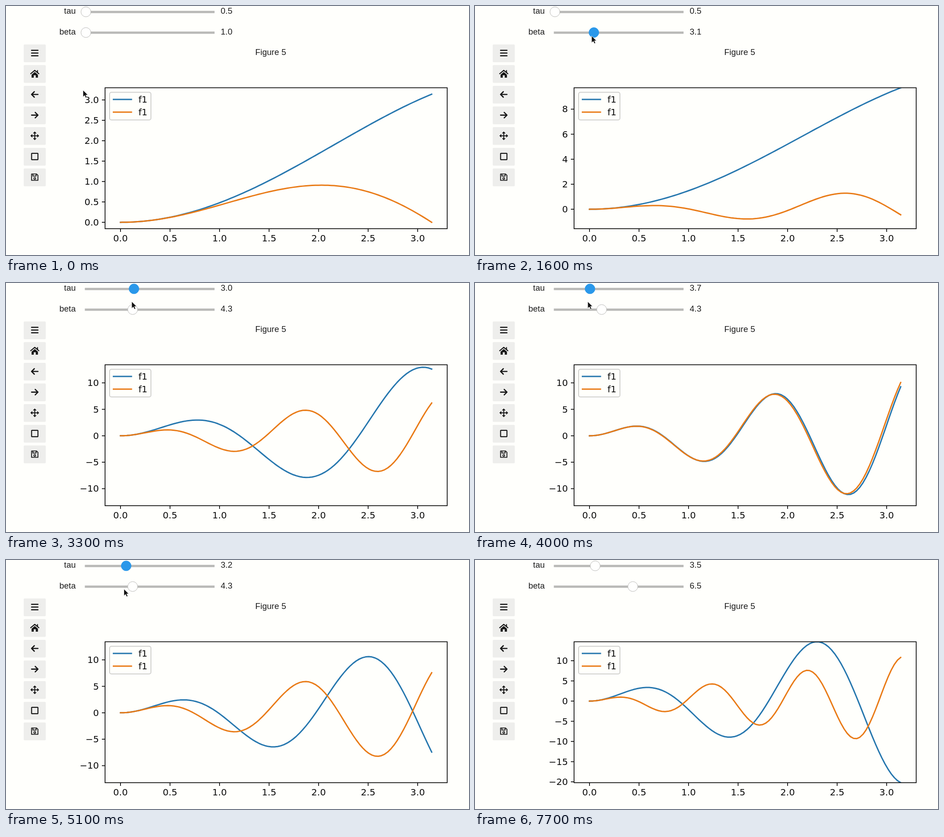
Recreate the animation shown at these times as an HTML page. Size 1019 by 549 pixels, loop 7900 ms.

```html
<!DOCTYPE html>
<html lang="en">
<head>
<meta charset="utf-8">
<title>Interactive plot</title>
<style>
  html, body { margin: 0; width: 100%; height: 100%; overflow: hidden; background: #fffffc; }
  svg { display: block; width: 1019px; height: 549px; }
  .ui { font: 18.5px "Liberation Sans", Arial, sans-serif; fill: #1c1c1c; }
  .plot { font: 20px "DejaVu Sans", sans-serif; fill: #0a0a0a; }
  .end { text-anchor: end; }
  .mid { text-anchor: middle; }
  .axis { fill: none; stroke: #0a0a0a; stroke-width: 1.7; }
  .curve { fill: none; stroke-width: 3; stroke-linecap: square; stroke-linejoin: round; }
  .blue { stroke: #2677ae; }
  .orange { stroke: #e97b17; }
  .icon { fill: none; stroke: #171717; stroke-width: 2.2; stroke-linecap: round; stroke-linejoin: round; }
  .solid { fill: #171717; }
</style>
</head>
<body>
<svg id="stage" viewBox="0 0 1019 549">
  <defs><clipPath id="clip"><rect x="218" y="180.3" width="753" height="310.7"/></clipPath></defs>
  <rect width="1019" height="549" fill="#fffffc"/>
  <g id="tools"></g>
  <g id="sliders"></g>
  <text class="ui mid" x="582.5" y="107.7">Figure 5</text>
  <g id="xTicks" class="plot"></g>
  <g id="yTicks" class="plot"></g>
  <g clip-path="url(#clip)">
    <polyline id="blue" class="curve blue"/>
    <polyline id="orange" class="curve orange"/>
  </g>
  <rect class="axis" x="218" y="180.3" width="753" height="310.7"/>
  <g class="plot">
    <rect x="228" y="190.3" width="91" height="61" rx="4" fill="#fffffc" fill-opacity=".8" stroke="#d0d0ce" stroke-width="2"/>
    <path class="curve blue" d="M236.5 206H276"/>
    <path class="curve orange" d="M236.5 234H276"/>
    <text x="291.5" y="213">f1</text>
    <text x="291.5" y="241">f1</text>
  </g>
  <path id="cursor" d="M0 0V15L3.6 11.8L6 17L8.6 15.8L6.2 10.8H10.8Z" fill="#111" stroke="#fffffc" stroke-width=".8"/>
</svg>
<script>
const LOOP = 7900, STEP = 100, FRAMES = LOOP / STEP;
const BOX = { left: 218, top: 180.3, bottom: 491 };
const SAMPLES = Array.from({ length: 100 }, (_, i) => Math.PI * i / 99);

const $ = id => document.getElementById(id);
const add = (parent, markup) => parent.insertAdjacentHTML('beforeend', markup);
const px = x => 252 + 218 * x;
const ramp = (from, to, frame) => Math.min(1, Math.max(0, (frame - from) / (to - from)));

// A slider has 100 stops; each drag is [from, to, stops moved] at constant speed.
const tau = {
  name: 'tau', y: 12.9, min: 0.5,
  drags: [[27, 31, 22], [31.6, 33.2, 17], [38, 43.3, -32], [45, 49, 21], [50, 51, 3]]
};
const beta = {
  name: 'beta', y: 58.5, min: 1,
  drags: [[10, 14, 23], [15, 17, 13], [56.5, 59.5, 24]]
};
const sliders = [tau, beta];
const stop = (slider, frame) =>
  Math.round(slider.drags.reduce((sum, [from, to, by]) => sum + by * ramp(from, to, frame), 0));
const value = (slider, frame) => slider.min + (10 - slider.min) * stop(slider, frame) / 99;
const knobX = (slider, frame) => 175.9 + 2.858 * stop(slider, frame);

function activeSlider(frame) {
  if (frame < 7 || frame > 76) return null;
  return frame > 25 && frame < 54 ? tau : beta;
}

// The pointer glides from goal to goal; a held knob is a moving goal.
const hold = (slider, dy) => frame => [knobX(slider, frame) - 5, slider.y + dy];
const glides = [
  { from: 1, to: 3, goal: () => [184, 98] },
  { from: 4, to: 7, goal: hold(beta, 7.5) },
  { from: 20, to: 25, goal: hold(tau, 28) },
  { from: 46, to: 51, goal: hold(tau, 51) },
  { from: 51, to: 54, goal: hold(beta, 14.5) },
  { from: 67, to: 71, goal: () => [177, 5] }
];
function pointer(frame) {
  return glides.reduce(([x, y], { from, to, goal }) => {
    const [gx, gy] = goal(frame), u = ramp(from, to, frame);
    return [x + (gx - x) * u, y + (gy - y) * u];
  }, [169.5, 185.5]);
}

// Readouts trail the knob by one step, the curves by two.
function curves(frame) {
  const t = value(tau, frame - 2), b = value(beta, frame - 2);
  return {
    blue: SAMPLES.map(x => b * x * Math.sin(t * x)),
    orange: SAMPLES.map(x => t * x * Math.sin(b * x))
  };
}

// The vertical limits only ever stretch.
const limits = [];
let low = -0.05 * Math.PI, high = 1.05 * Math.PI;
for (let frame = 0; frame < FRAMES; frame++) {
  const { blue, orange } = curves(frame);
  low = Math.min(low, ...blue, ...orange);
  high = Math.max(high, ...blue, ...orange);
  limits.push([low, high]);
}

function tickStep(range) {
  const raw = range / 7, power = 10 ** Math.floor(Math.log10(raw));
  return power * [1, 2, 2.5, 5, 10].find(s => s * power >= raw);
}

function yTicks(lo, hi, py) {
  const step = tickStep(hi - lo), digits = Number.isInteger(step) ? 0 : 1;
  let markup = '';
  for (let i = Math.ceil(lo / step); i * step <= hi; i++) {
    const y = py(i * step), label = (i * step).toFixed(digits).replace('-', '\u2212');
    markup += `<path class="axis" d="M${BOX.left} ${y}h-7"/><text class="end" x="204.5" y="${y + 7}">${label}</text>`;
  }
  return markup;
}

function buildTools() {
  const icons = [
    '<path d="M-7 -6H7M-7 0H7M-7 6H7" stroke-width="2.6"/>',
    '<path class="solid" stroke="none" d="M0 -4L7 2V8.5H2.2V3.4H-2.2V8.5H-7V2Z"/><path d="M-9 0L0 -7.6L9 0M6 -7V-3"/>',
    '<path d="M7 0H-7M-1 -6L-7 0L-1 6" stroke-width="2.6"/>',
    '<path d="M-7 0H7M1 -6L7 0L1 6" stroke-width="2.6"/>',
    '<path d="M-8 0H8M0 -8V8" stroke-width="2"/><path class="solid" stroke-width="1" d="M-3 -6L0 -9L3 -6ZM-3 6L0 9L3 6ZM-6 -3L-9 0L-6 3ZM6 -3L9 0L6 3Z"/>',
    '<rect x="-7" y="-7" width="14" height="14" rx=".8"/>',
    '<path d="M-7 -7H4L7 -4V7H-7ZM-4 -6.5V-2.5H3V-6.5" stroke-width="1.9"/><circle cy="2.6" r="2" stroke-width="1.7"/>'
  ];
  icons.forEach((icon, i) => {
    const y = 103.8 + 45.6 * i;
    add($('tools'), `<rect x="39" y="${y - 19.1}" width="48.5" height="39.2" rx="2" fill="#eeeeec"/>
      <g class="icon" transform="translate(63.3 ${y})">${icon}</g>`);
  });
}

function buildSliders() {
  for (const { name, y } of sliders) {
    add($('sliders'), `<text class="ui end" x="153.5" y="${y + 4.3}">${name}</text>
      <rect x="173.5" y="${y - 2.2}" width="285.5" height="5" fill="#b9b9b7"/>
      <circle id="${name}Knob" cy="${y}" r="10.9"/>
      <text id="${name}Value" class="ui" x="472.5" y="${y + 4.3}"></text>`);
  }
}

function buildXTicks() {
  for (let i = 0; i <= 6; i++) {
    const x = px(i / 2);
    add($('xTicks'), `<path class="axis" d="M${x} ${BOX.bottom}v7"/><text class="mid" x="${x}" y="519">${(i / 2).toFixed(1)}</text>`);
  }
}

function drawSlider(slider, frame) {
  const knob = $(slider.name + 'Knob');
  const active = slider === activeSlider(frame);
  knob.setAttribute('cx', knobX(slider, frame));
  knob.setAttribute('fill', active ? '#2a98ea' : '#fffffe');
  knob.setAttribute('stroke', active ? '#2a98ea' : '#b9b9b7');
  $(slider.name + 'Value').textContent = value(slider, frame - 1).toFixed(1);
}

function drawPlot(frame) {
  const [lo, hi] = limits[frame];
  const py = v => BOX.bottom - (v - lo) / (hi - lo) * (BOX.bottom - BOX.top);
  $('yTicks').innerHTML = yTicks(lo, hi, py);
  for (const [id, values] of Object.entries(curves(frame))) {
    $(id).setAttribute('points', values.map((v, i) => `${px(SAMPLES[i]).toFixed(2)},${py(v).toFixed(2)}`).join(' '));
  }
}

function drawCursor(frame) {
  const [x, y] = pointer(frame);
  $('cursor').setAttribute('transform', `translate(${x} ${y})`);
  $('cursor').setAttribute('visibility', frame > 71 ? 'hidden' : 'visible');
}

let shown = -1;
function render(now) {
  const frame = Math.floor((now % LOOP) / STEP);
  if (frame === shown) return;
  shown = frame;
  sliders.forEach(slider => drawSlider(slider, frame));
  drawPlot(frame);
  drawCursor(frame);
}

buildTools();
buildSliders();
buildXTicks();
const start = performance.now();
function tick() {
  render(performance.now() - start);
  requestAnimationFrame(tick);
}
tick();
</script>
</body>
</html>
```
